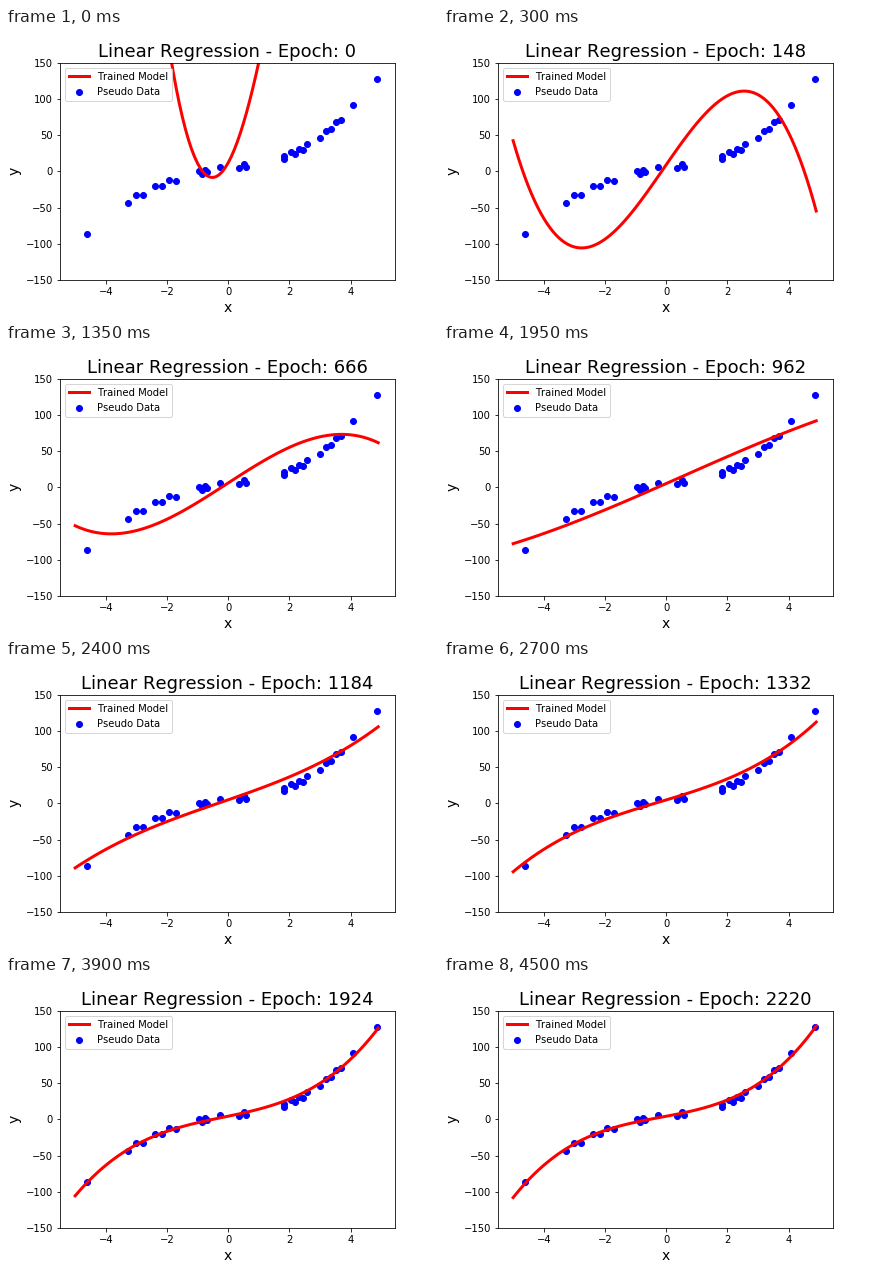
Write a matplotlib script that moves like this. It is 432 px wide and 288 px high and loops after 4.8 s.

```python
import numpy as np
import matplotlib.pyplot as plt
from matplotlib.animation import FuncAnimation

plt.rcParams["font.family"] = "DejaVu Sans"
plt.rcParams["text.kerning_factor"] = 6

STEPS, EPOCHS_PER_STEP = 32, 74
LAST = 30  # the final fit is held for two steps

# Cubic coefficients, constant first: the fit relaxes in a slow and a fast mode
FINAL = np.array([4.1, 6.8, 0.39, 0.728])
SLOW = np.array([6.5, 71.6, -1.75, -4.78])
FAST = np.array([1.2, -1.4, 70.4, -2.95])
SLOW_TAU, FAST_TAU = 534, 5

# Samples come in evenly spaced clusters: first x, last x, count
CLUSTERS = [(-4.62, -4.62, 1), (-3.27, -2.78, 3), (-2.39, -1.72, 4),
            (-0.96, -0.68, 4), (-0.27, 0.35, 2), (0.5, 0.57, 2),
            (1.81, 1.81, 2), (2.05, 2.56, 5), (3.01, 3.7, 5),
            (4.09, 4.86, 2)]


def cubic(x, coef):
    return np.polynomial.polynomial.polyval(x, coef)


def coef_at(epoch):
    return (FINAL + SLOW * np.exp(-epoch / SLOW_TAU)
            + FAST * np.exp(-epoch / FAST_TAU))


def samples():
    x = np.concatenate([np.linspace(*c) for c in CLUSTERS])
    zigzag = 2.2 * (-1.0) ** np.arange(len(x))
    ripple = 2 * np.cos(1.5 * (x + 0.5))
    return x, cubic(x, FINAL) + zigzag + ripple - 0.6


fig = plt.figure(figsize=(6, 4), dpi=72, facecolor="white")
ax = fig.add_axes([0.125, 0.125, 0.775, 0.755])
ax.set_xlim(-5.495, 5.442)
ax.set_ylim(-150, 150)
ax.set_xticks(range(-4, 5, 2))
ax.set_yticks(range(-150, 151, 50))
ax.set_xlabel("x", fontsize=14)
ax.set_ylabel("y", fontsize=14)
title = ax.set_title("", fontsize=18)

xs = np.arange(-50, 50) / 10
line, = ax.plot(xs, cubic(xs, coef_at(0)), color="red", lw=3,
                label="Trained Model")
ax.scatter(*samples(), color="blue", label="Pseudo Data")
ax.legend(loc="upper left", fontsize=10)


def update(i):
    epoch = EPOCHS_PER_STEP * min(i, LAST)
    line.set_ydata(cubic(xs, coef_at(epoch)))
    title.set_text(f"Linear Regression - Epoch: {epoch}")
    return line, title


anim = FuncAnimation(fig, update, frames=STEPS, interval=150,
                     repeat=True, repeat_delay=0, blit=False)
plt.show()
```
